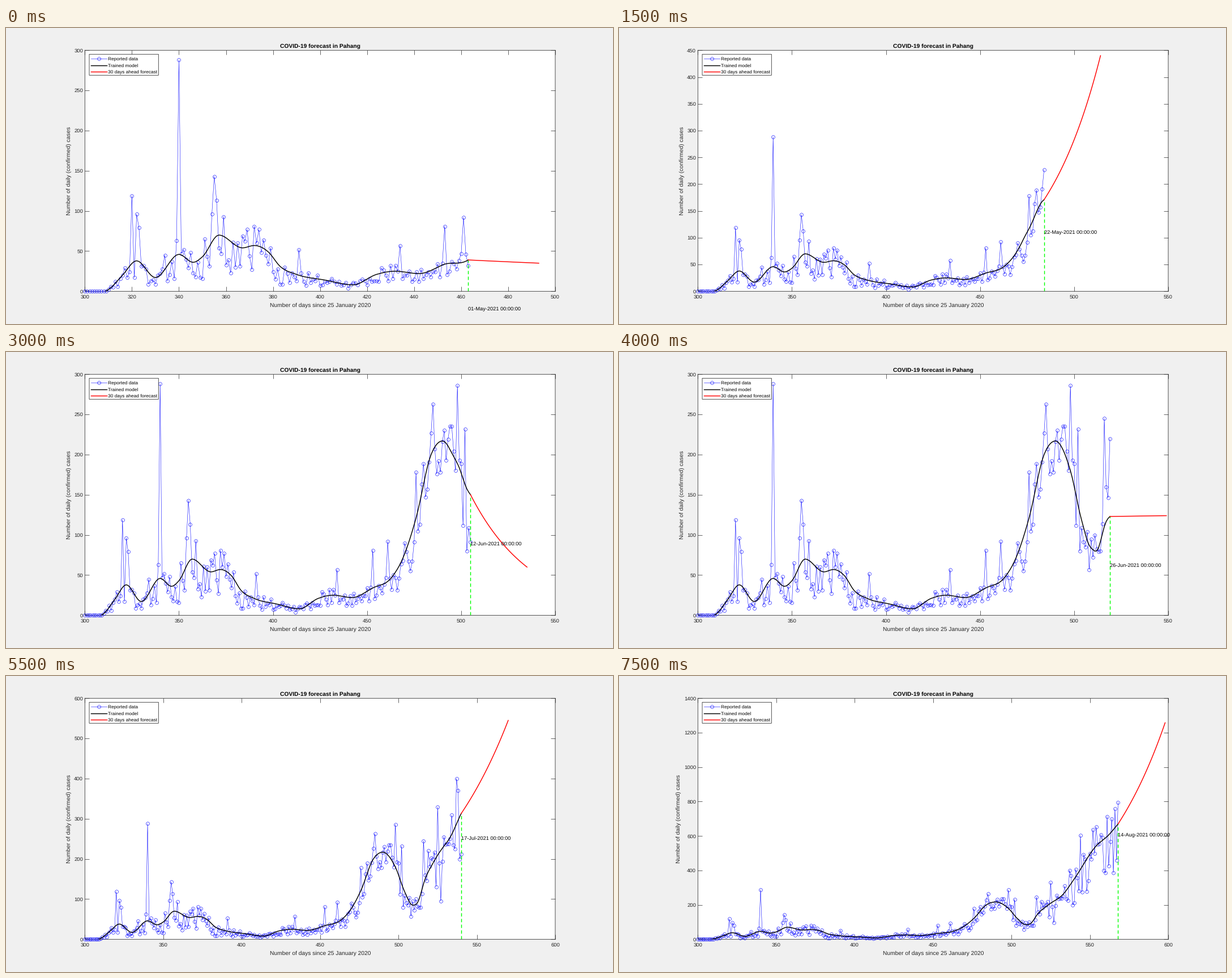
Write a matplotlib script that moves like this. It is 1072x522 px and loops after 8 s.

```python
import numpy as np
import matplotlib.pyplot as plt
from matplotlib.animation import FuncAnimation
from matplotlib.patches import Rectangle

W, H, DPI = 1072, 522, 100
PX = 72 / DPI  # points per pixel
START, FIRST, LAST, WEEK, AHEAD = 300, 463, 568, 7, 30
LEFT, TOP, RIGHT, BOTTOM = 139.3, 39.3, 970, 464.3
GREY = (0.15, 0.15, 0.15)
BLUE = (0, 0, 1)

plt.rcParams.update({
    "font.family": "Liberation Sans",
    "text.hinting": "none",
    "axes.linewidth": 0.8 * PX,
})

# Turning points of the smoothed daily cases: (day, value)
TREND = [
    (300, 0), (310, 2), (316, 20), (322, 38), (330, 17), (340, 46), (346, 36),
    (350, 43), (357, 70), (367, 54), (372, 57), (378, 49), (383, 31), (390, 21),
    (402, 14), (414, 8), (424, 21), (432, 25), (442, 22), (453, 34), (463, 47),
    (469, 71), (476, 121), (484, 200), (490, 217), (498, 180), (504, 118),
    (509, 85), (512, 90), (517, 150), (524, 203), (533, 262), (540, 350),
    (554, 542), (562, 605), (568, 667),
]

# The most striking single days
SPIKES = {
    320: 119, 322: 96, 323: 79, 334: 45, 340: 288, 354: 96, 355: 143, 356: 113,
    391: 52, 434: 57, 453: 81, 461: 92, 476: 178, 484: 227, 485: 263, 498: 286,
    502: 232, 516: 245, 519: 220, 525: 329, 527: 95, 537: 400, 544: 603,
    552: 638, 554: 653, 561: 714, 568: 795,
}

# Each week: fitted cases today, forecast cases 30 days on
OUTLOOK = [
    (39, 35), (78, 97), (112, 262), (171, 440), (232, 640), (235, 424),
    (150, 60), (86, 35), (123, 124), (205, 356), (262, 358), (313, 545),
    (420, 780), (523, 1195), (600, 1358), (670, 1258),
]


def smooth(x, points):
    """Cubic Hermite curve through the points, level at each turn."""
    xs, ys = np.array(points, float).T
    rise = np.diff(ys) / np.diff(xs)
    slope = np.gradient(ys, xs)
    slope[1:-1][rise[1:] * rise[:-1] <= 0] = 0
    i = np.clip(np.searchsorted(xs, x, side="right") - 1, 0, len(xs) - 2)
    h = xs[i + 1] - xs[i]
    u = (x - xs[i]) / h
    return ((1 + 2 * u) * (1 - u) ** 2 * ys[i] + u * (1 - u) ** 2 * h * slope[i]
            + u * u * (3 - 2 * u) * ys[i + 1] + u * u * (u - 1) * h * slope[i + 1])


def daily_cases(days, trend):
    """Scatter around the trend, wider while counts are low."""
    rng = np.random.default_rng(25)
    spread = np.interp(days, [380, 480], [0.6, 0.3])
    cases = np.round(trend * (0.88 + spread * rng.uniform(-1, 1, len(days))))
    for day, value in SPIKES.items():
        cases[day - START] = value
    return np.maximum(cases, 0)


def date_label(n):
    day = n + 1
    for month, length in (("May", 31), ("Jun", 30), ("Jul", 31), ("Aug", 31)):
        if day <= length:
            break
        day -= length
    return f"{day:02d}-{month}-2021 00:00:00"


def pixel_text(x, y, s, size, **kw):
    kw = {"ha": "center", "va": "center_baseline", "color": GREY, **kw}
    return fig.text(x / W, 1 - y / H, s, fontsize=size * PX, **kw)


days = np.arange(START, LAST + 1)
trend = smooth(days, TREND)
cases = daily_cases(days, trend)

fig = plt.figure(figsize=(W / DPI, H / DPI), dpi=DPI, facecolor="#f0f0f0")
ax = fig.add_axes([LEFT / W, 1 - BOTTOM / H, (RIGHT - LEFT) / W, (BOTTOM - TOP) / H])
for spine in ax.spines.values():
    spine.set(color=GREY, snap=False)
ax.tick_params(direction="in", top=True, right=True, length=8 * PX, width=0.7 * PX,
               color=GREY, labelcolor=GREY, labelsize=9.5 * PX)
ax.tick_params(axis="x", pad=6.5 * PX)
ax.tick_params(axis="y", pad=3.2 * PX)

CASES = dict(color=BLUE, lw=0.55 * PX, marker="o", ms=5.8 * PX, mfc="none",
             mew=0.6 * PX)
MODEL = dict(color="black", lw=1.45 * PX)
FUTURE = dict(color="red", lw=1.45 * PX)

reported, = ax.plot([], [], clip_on=False, zorder=3, **CASES)
model, = ax.plot([], [], zorder=4, **MODEL)
forecast, = ax.plot([], [], zorder=5, **FUTURE)
today, = ax.plot([], [], color=(0, 1, 0), lw=1.4 * PX, zorder=4.5,
                 linestyle=(0, (4.2, 3)))
date = ax.text(0, 0, "", fontsize=9.3 * PX, color="black", va="center_baseline",
               zorder=6)

pixel_text(555, 31, "COVID-19 forecast in Pahang", 10.26, weight="bold",
           color="black")
pixel_text(555, 488, "Number of days since 25 January 2020", 10.23)
ylabel = pixel_text(111, 251.5, "Number of daily (confirmed) cases", 10.23,
                    rotation=90, va="center")

# Legend, laid out in pixels
key = fig.add_axes([0, 0, 1, 1], zorder=5)
key.set(xlim=(0, W), ylim=(H, 0))
key.axis("off")
key.add_patch(Rectangle((147, 46.3), 122.3, 37, fc="white", ec=GREY, lw=0.8 * PX,
                        snap=False))
for y, label, style in ((54, "Reported data", CASES),
                        (65.5, "Trained model", MODEL),
                        (77, "30 days ahead forecast", FUTURE)):
    key.plot([150, 178], [y, y], **{**style, "marker": None})
    key.text(180, y + 0.3, label, fontsize=8.37 * PX, va="center_baseline")
key.plot([164], [54], **CASES)


def draw(k):
    t = FIRST + WEEK * k
    n = t - START + 1
    now, later = OUTLOOK[k]

    # The fit bends towards its own last value; the forecast grows at a steady rate
    near = np.clip((days[:n] - t + 11) / 11, 0, 1) ** 1.5
    fit = trend[:n] + (now - trend[n - 1]) * near
    steps = np.arange(AHEAD + 1)
    future = now * (later / now) ** (steps / AHEAD)

    reported.set_data(days[:n], cases[:n])
    model.set_data(days[:n], fit)
    forecast.set_data(t + steps, future)
    today.set_data([t, t], [0, now])

    top = max(cases[:n].max(), future.max())
    step = 50 if top <= 450 else 100 if top <= 800 else 200
    ymax = int(np.ceil(top / step) * step)
    xmax = int(np.ceil((t + AHEAD) / 50) * 50)
    ax.set(xlim=(START, xmax), ylim=(0, ymax))
    ax.set_xticks(range(START, xmax + 1, 20 if xmax == 500 else 50))
    ax.set_yticks(range(0, ymax + 1, step))
    ylabel.set_x((111 if ymax < 1000 else 105) / W)

    date.set_position((t, now - 60 - ymax / 600))
    date.set_text(date_label(WEEK * k))
    return reported, model, forecast, today, date


anim = FuncAnimation(fig, draw, frames=len(OUTLOOK), interval=500,
                     repeat=True, repeat_delay=0, blit=False)
plt.show()
```
